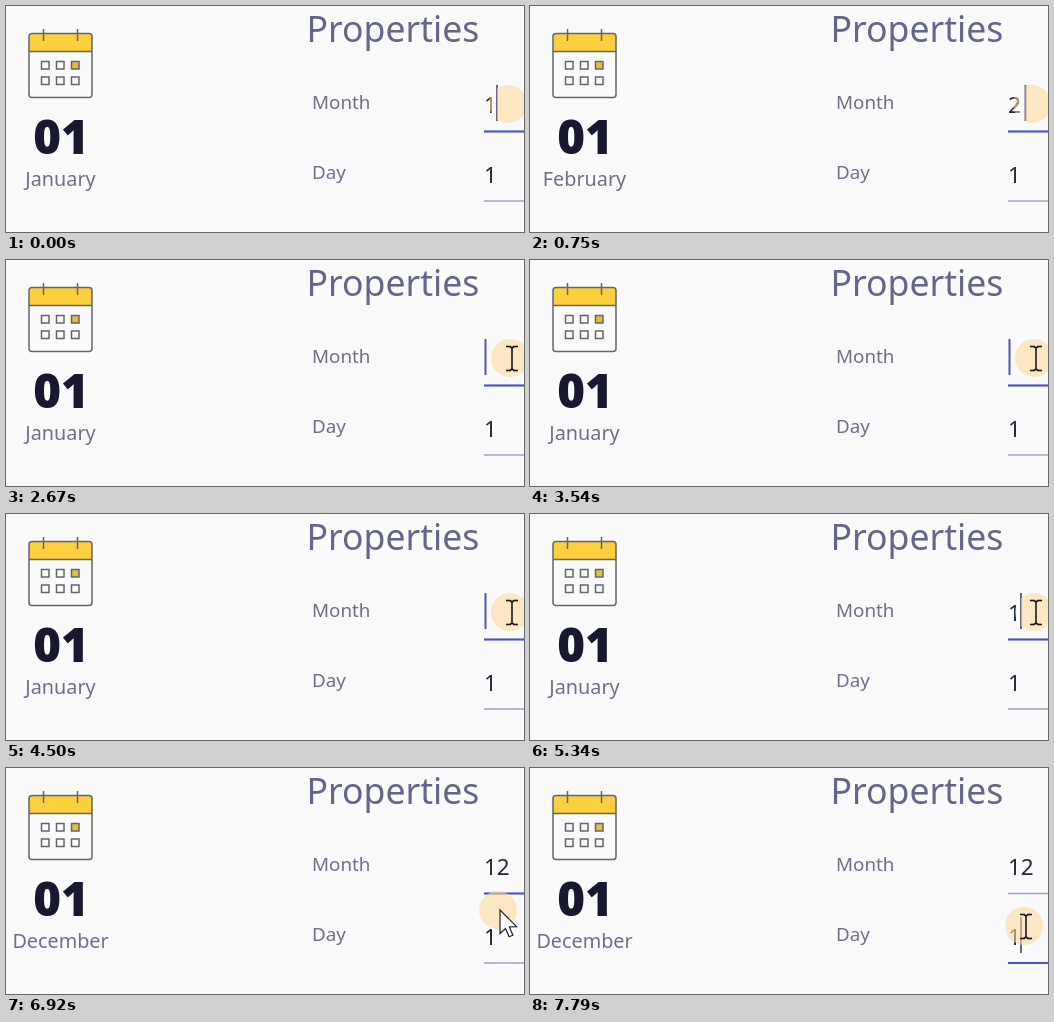
Animation of 518x226 px, one loop 8 s. Source, as an HTML page with a canvas:

```html
<!DOCTYPE html>
<html lang="en">
<head>
<meta charset="utf-8">
<title>Date properties</title>
<style>
  html, body { margin: 0; width: 100%; height: 100%; overflow: hidden; background: #fbfafa; }
  canvas { display: block; }
</style>
</head>
<body>
<canvas id="stage" width="518" height="226"></canvas>
<script>
const ctx = document.getElementById('stage').getContext('2d');
const LOOP = 8000;
const FONT = '"Noto Sans", "Open Sans", sans-serif';
const BOLD_FONT = '"Open Sans", "Noto Sans", sans-serif';
const PAPER = '#fbfafa', TITLE = '#64678a', GREY = '#6f6f88', INK = '#18182e';
const DIGIT = '#28283a', LINE = '#66646c', RULE = '#a3a3c4', BLUE = '#4a52c4';
const GLOW = 'rgba(251, 221, 156, 0.58)', TINT = '#b09a66';
const MONTHS = ['January', 'February', 'March', 'April', 'May', 'June', 'July',
  'August', 'September', 'October', 'November', 'December'];

// Time of each key press and the month value after it
const KEYS = [
  [0, '1'], [90, ''], [350, '2'], [1000, ''], [1200, '3'], [1500, ''], [1620, '4'],
  [1990, ''], [2210, '5'], [2590, ''], [2880, '6'], [3040, ''], [3250, '7'],
  [3500, ''], [3620, '8'], [3860, ''], [4000, '9'], [4250, ''], [4660, '1'],
  [4800, '10'], [5340, '1'], [5500, '11'], [5900, '1'], [6000, '12']
];
// Pointer stops: time, x, y
const PATH = [[0, 504, 98], [1000, 504, 98], [1250, 506, 98], [6790, 506, 98],
  [6920, 494, 142], [7450, 496, 158], [LOOP, 496, 158]];
const POINTER_SHOWN = 1000, LEAVE = 6790, CLICK = 7640, FOCUS_TIME = 150;
const FIELD_X = 478, MONTH_Y = 98, DAY_Y = 168, GLOW_R = 19;

const clamp = v => Math.max(0, Math.min(1, v));

function text(str, x, y, size, weight, color, align = 'left', font = FONT) {
  ctx.font = `${weight} ${size}px ${font}`;
  ctx.textAlign = align;
  ctx.fillStyle = color;
  ctx.fillText(str, x, y);
}

const fieldText = (str, y, color) => text(str, FIELD_X, y + 9, 22.5, 500, color);

function line(x1, y1, x2, y2, color, width) {
  ctx.strokeStyle = color;
  ctx.lineWidth = width;
  ctx.beginPath();
  ctx.moveTo(x1, y1);
  ctx.lineTo(x2, y2);
  ctx.stroke();
}

function calendar() {
  ctx.lineWidth = 1.5;
  ctx.strokeStyle = LINE;
  ctx.beginPath();
  ctx.roundRect(23, 27.5, 63, 64, 3);
  ctx.save();
  ctx.clip();
  ctx.fillStyle = '#fccf3c';
  ctx.fillRect(23, 27, 63, 18);
  ctx.restore();
  ctx.stroke();
  line(23, 45.5, 86, 45.5, LINE, 1.3);
  for (const x of [37.5, 71.5]) line(x, 23, x, 35, LINE, 1.5);
  for (let i = 0; i < 6; i++) {
    const x = 35.5 + (i % 3) * 15, y = 55.5 + Math.floor(i / 3) * 15.5;
    if (i === 2) {
      ctx.fillStyle = '#e6bd3c';
      ctx.fillRect(x, y, 7.5, 7.5);
    }
    ctx.lineWidth = 1.5;
    ctx.strokeRect(x, y, 7.5, 7.5);
  }
}

function pointerAt(t) {
  let i = 0;
  while (i < PATH.length - 2 && t >= PATH[i + 1][0]) i++;
  const [t0, x0, y0] = PATH[i], [t1, x1, y1] = PATH[i + 1];
  const k = clamp((t - t0) / (t1 - t0));
  const e = t0 >= LEAVE + FOCUS_TIME - 20 ? 1 - (1 - k) ** 3 : k;
  return { x: x0 + (x1 - x0) * e, y: y0 + (y1 - y0) * e };
}

function caretX(value) {
  return [...value].reduce((x, d) => x + (d === '1' ? 11.5 : 16), FIELD_X + 1.5);
}

function caret(value, y, since) {
  if (since % 1000 >= 500) return;
  const x = caretX(value);
  line(x, y - 19, x, y + 17, value ? '#6a6a80' : '#5058b0', 2);
}

function underline(y, focus, hover) {
  line(FIELD_X, y, 518, y, hover ? '#50506a' : RULE, hover ? 2 : 1.7);
  if (focus > 0) line(518 - 40 * focus, y, 518, y, BLUE, 2.2);
}

// While typing, the glow tints the glyph but leaves the paper behind it clear
function glow(p, value, typing) {
  const circle = () => {
    ctx.beginPath();
    ctx.arc(p.x - 2, p.y, GLOW_R, 0, 2 * Math.PI);
  };
  const overText = typing && value;
  ctx.save();
  if (overText) {
    ctx.beginPath();
    ctx.rect(caretX(value), 0, 60, 226);
    ctx.clip();
  }
  circle();
  ctx.fillStyle = GLOW;
  ctx.fill();
  ctx.restore();
  if (!overText) return;
  ctx.save();
  circle();
  ctx.clip();
  fieldText(value, MONTH_Y, TINT);
  ctx.restore();
}

function beam(x, y) {
  const color = '#17171f', w = 1.6;
  line(x, y - 11, x, y + 11, color, w);
  for (const v of [-1, 1]) {
    for (const h of [-1, 1]) {
      line(x + 6 * h, y + 12 * v, x + 1.5 * h, y + 12 * v, color, w);
      line(x + 2 * h, y + 12 * v, x, y + 10.5 * v, color, w);
    }
  }
}

function arrow(x, y) {
  const points = [[0, 0], [0, 17], [4, 13.3], [6.6, 19.3], [9.3, 18.2], [6.8, 12.2], [12, 12]];
  ctx.save();
  ctx.translate(x, y);
  ctx.scale(1.38, 1.38);
  ctx.beginPath();
  points.forEach(([px, py]) => ctx.lineTo(px, py));
  ctx.closePath();
  ctx.fillStyle = '#ffffff';
  ctx.fill();
  ctx.strokeStyle = '#26262e';
  ctx.lineWidth = 0.9;
  ctx.stroke();
  ctx.restore();
}

function draw(t) {
  const [keyTime, value] = KEYS.filter(k => k[0] <= t).pop();
  const p = pointerAt(t);
  const focus = clamp((t - CLICK) / FOCUS_TIME);
  const onDay = p.y > 150;

  ctx.fillStyle = PAPER;
  ctx.fillRect(0, 0, 518, 226);
  calendar();
  text('01', 55, 148, 47.5, 800, INK, 'center', BOLD_FONT);
  text(MONTHS[(value || 1) - 1], 54.5, 180, 19.8, 400, GREY, 'center');
  text('Properties', 300.5, 36, 35.6, 500, TITLE);
  text('Month', 306, 103, 18.8, 400, GREY);
  text('Day', 306, 173, 18.8, 400, GREY);

  fieldText(value, MONTH_Y, DIGIT);
  fieldText('1', DAY_Y, DIGIT);
  underline(125.5, 1 - focus, false);
  underline(195, focus, onDay);
  if (t < CLICK) caret(value, MONTH_Y, t - keyTime);
  else caret('1', DAY_Y, t - CLICK);

  glow(p, value, t < LEAVE);
  if (t < POINTER_SHOWN) return;
  if (p.y < 118 || onDay) beam(p.x, p.y + 0.5);
  else arrow(p.x, p.y);
}

const start = performance.now();
function tick() {
  draw((performance.now() - start) % LOOP);
  requestAnimationFrame(tick);
}
tick();
</script>
</body>
</html>
```
